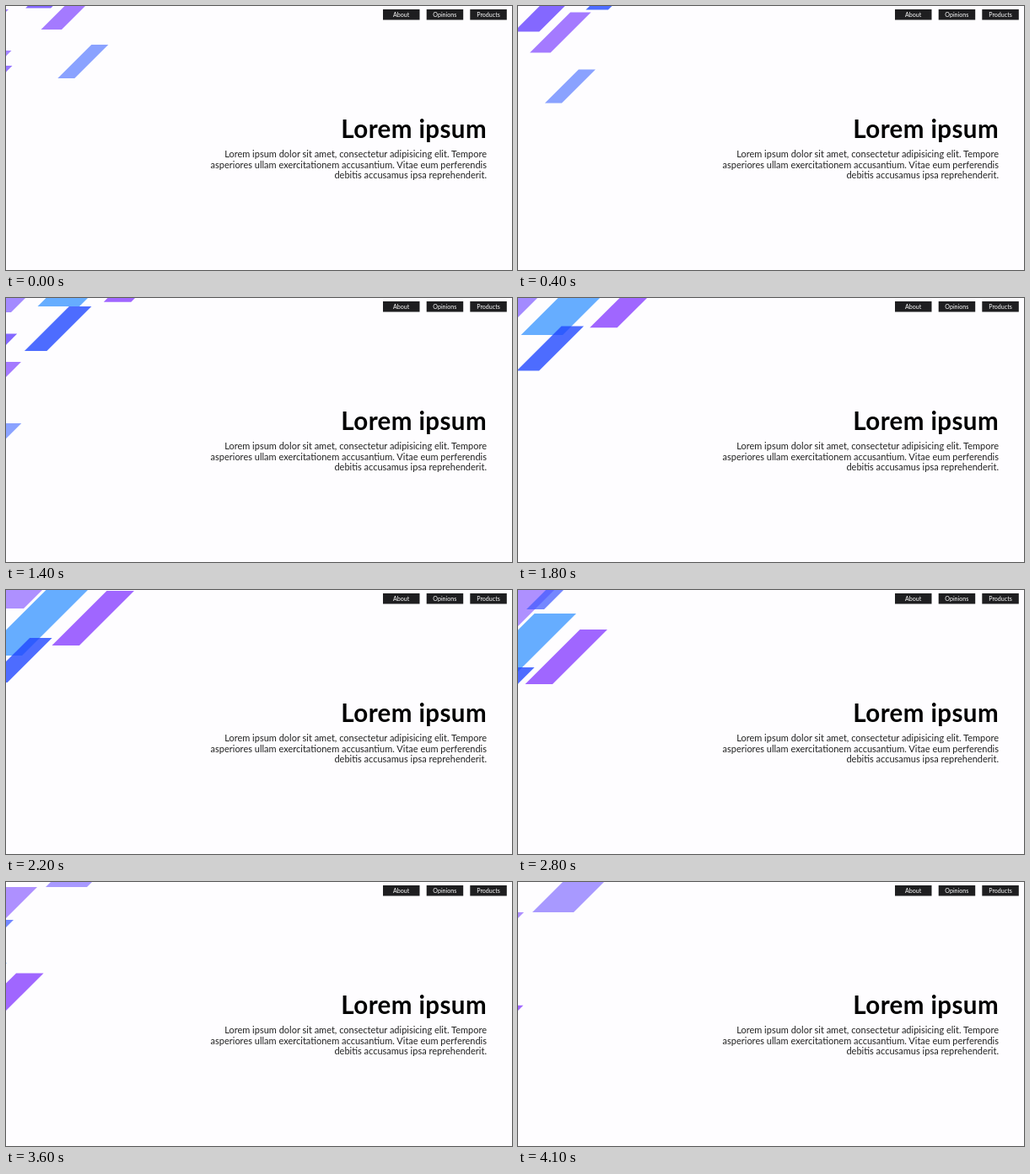
Recreate the animation shown at these times as an HTML page. Size 600 by 314 pixels, loop 4.2 s.

```html
<!DOCTYPE html>
<html lang="en">
<head>
<meta charset="utf-8">
<title>Falling bars</title>
<style>
  html, body { margin: 0; height: 100%; overflow: hidden; background: #fefdff; }
  svg { display: block; width: 600px; height: 314px; font-family: Lato, sans-serif; }
  .title { font-size: 29.5px; font-weight: 700; letter-spacing: .4px; }
  .copy { font-size: 11px; fill: #222; }
  .menu { font-size: 7.1px; fill: #fff; text-anchor: middle; }
  .title, .copy { text-anchor: end; }
  .menu rect { fill: #1e1e20; }
</style>
</head>
<body>
<svg viewBox="0 0 600 314">
  <g id="bars"></g>
  <g class="menu">
    <rect x="447" y="4" width="43.5" height="12.5"/><text x="468.7" y="12.6">About</text>
    <rect x="498.7" y="4" width="43.5" height="12.5"/><text x="520.3" y="12.6">Opinions</text>
    <rect x="550.3" y="4" width="43.5" height="12.5"/><text x="572" y="12.6">Products</text>
  </g>
  <text class="title" x="570" y="157">Lorem ipsum</text>
  <g class="copy">
    <text x="570" y="180">Lorem ipsum dolor sit amet, consectetur adipisicing elit. Tempore</text>
    <text x="570" y="192.5">asperiores ullam exercitationem accusantium. Vitae eum perferendis</text>
    <text x="570" y="205">debitis accusamus ipsa reprehenderit.</text>
  </g>
</svg>
<script>
const LOOP = 4200, STEP = 100;

// right: where the right edge meets y = 0; bottom: lower edge at time 0; speed: px/s
const bars = [
  { right: 7, width: 25, height: 50, bottom: 54, speed: 70, color: '#a484ff' },
  { right: 59.5, width: 25, height: 50, bottom: 103, speed: 70, color: '#a484ff' },
  { right: 78.5, width: 25, height: 50, bottom: 121, speed: 70, color: '#9878ff' },
  { right: 94, width: 24.5, height: 48, bottom: 28, speed: 68.6, color: '#a47aff' },
  { right: 167.3, width: 20, height: 40, bottom: 86, speed: 73.6, color: '#8aa2ff' },
  { right: 55.7, width: 30, height: 58, bottom: 2.5, speed: 70, color: '#8468ff' },
  { right: 23, width: 24, height: 48, bottom: -81, speed: 70, color: '#a38aff' },
  { right: 97, width: 49.5, height: 101, bottom: -109, speed: 85, color: '#66adff' },
  { right: 111.5, width: 26.5, height: 53, bottom: -18.8, speed: 58.5, color: 'rgb(33 73 255 / .8)' },
  { right: 153, width: 32.5, height: 65, bottom: -102.7, speed: 76.7, color: '#a066ff' },
  { right: 43, width: 50, height: 100, bottom: -110, speed: 60, color: '#ae90ff' },
  { right: 54, width: 21, height: 42, bottom: -201, speed: 80, color: 'rgb(64 90 255 / .72)' },
  { right: 102, width: 49, height: 99, bottom: -210, speed: 60, color: '#a899ff' }
];

const group = document.getElementById('bars');
for (const bar of bars) {
  const { right, width, height, color } = bar;
  const left = right - width;
  bar.shape = document.createElementNS(group.namespaceURI, 'path');
  bar.shape.setAttribute('d', `M${left} 0H${right}l${height} ${-height}h${-width}z`);
  bar.shape.setAttribute('fill', color);
  group.append(bar.shape);
}

function draw() {
  const time = Math.floor(performance.now() % LOOP / STEP) * STEP / 1000;
  for (const { shape, bottom, speed } of bars) {
    const y = bottom + speed * time;
    shape.setAttribute('transform', `translate(${-y} ${y})`);
  }
  requestAnimationFrame(draw);
}
draw();
</script>
</body>
</html>
```
